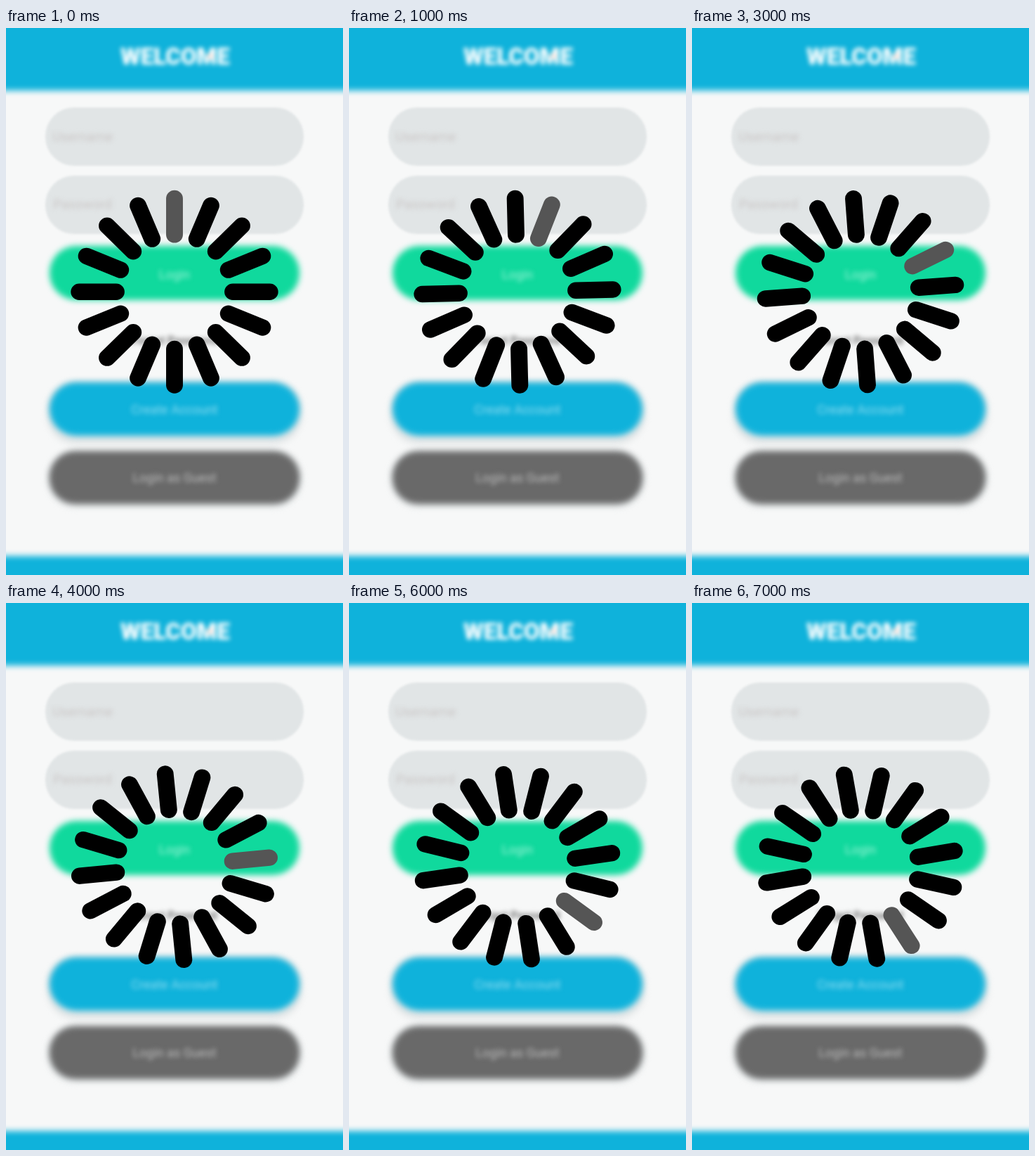
An HTML page for the animation above (8 s loop, 480 px wide and 778 px high).

```html
<!DOCTYPE html>
<html lang="en">
<head>
<meta charset="utf-8">
<title>Loading</title>
<style>
  html, body { margin: 0; height: 100%; overflow: hidden; background: #f7f8f8; }
  svg { display: block; width: 480px; height: 778px; }
  text { font: 18px Roboto, sans-serif; text-anchor: middle; }
  .soft { filter: url(#soft); }
  .edge { filter: url(#edge); }
  .label { filter: url(#label); }
</style>
</head>
<body>
<svg viewBox="0 0 480 778">
  <defs>
    <filter id="soft" filterUnits="userSpaceOnUse" x="-40" y="-40" width="560" height="860" color-interpolation-filters="sRGB"><feGaussianBlur stdDeviation="4.5"/></filter>
    <filter id="edge" filterUnits="userSpaceOnUse" x="0" y="0" width="480" height="778" color-interpolation-filters="sRGB"><feGaussianBlur stdDeviation="1.8"/></filter>
    <filter id="label" filterUnits="userSpaceOnUse" x="0" y="0" width="480" height="778" color-interpolation-filters="sRGB"><feGaussianBlur stdDeviation="3.2"/></filter>
  </defs>

  <g class="soft" fill="#0fb2db">
    <rect x="-40" y="-40" width="560" height="129"/>
    <rect x="-40" y="751" width="560" height="80"/>
  </g>
  <g class="edge" fill="#e1e5e6">
    <rect x="56" y="113" width="368" height="83" rx="41"/>
    <rect x="56" y="210" width="368" height="83" rx="41"/>
  </g>
  <g class="soft" fill="#e1e5e6">
    <rect x="58" y="502" width="364" height="90" rx="42"/>
    <rect x="58" y="600" width="364" height="82" rx="41"/>
  </g>
  <g class="soft">
    <rect x="62" y="310" width="356" height="77" rx="38" fill="#10d99d"/>
    <rect x="62" y="504" width="356" height="76" rx="38" fill="#0fb2db"/>
    <rect x="62" y="602" width="356" height="75" rx="37" fill="#696969"/>
  </g>

  <g class="label">
    <text x="241" y="52" fill="#fff" style="font-size:33px;font-weight:900">WELCOME</text>
    <circle cx="291" cy="40" r="5" fill="#ffe9e2"/>
    <g fill="#c9c5c5">
      <text x="109" y="161" style="font-size:19px">Username</text>
      <text x="109" y="257" style="font-size:19px">Password</text>
    </g>
    <text x="240" y="357" fill="#a0f3d8">Login</text>
    <text x="240" y="450" fill="#777" style="font-size:16px;font-weight:700">Forgot Password</text>
    <text x="240" y="549" fill="#8edcf0">Create Account</text>
    <text x="240" y="646" fill="#bbb">Login as Guest</text>
  </g>

  <g id="spinner" stroke-width="23.4" stroke-linecap="round"></g>
</svg>
<script>
  const BARS = 16, STEP_MS = 1000, STEPS = 8;
  const DRIFT = -360 / BARS / BARS;
  const spinner = document.getElementById('spinner');

  const bars = Array.from({ length: BARS }, (_, i) => {
    const bar = document.createElementNS('http://www.w3.org/2000/svg', 'line');
    bar.setAttribute('y1', -81.3);
    bar.setAttribute('y2', -132.8);
    bar.setAttribute('transform', `rotate(${i * 360 / BARS})`);
    return spinner.appendChild(bar);
  });

  function draw() {
    const step = Math.floor(performance.now() / STEP_MS) % STEPS;
    spinner.setAttribute('transform',
      `translate(240 375.2) scale(1.022 1) rotate(${step * DRIFT})`);
    bars.forEach((bar, i) => bar.setAttribute('stroke', i === step ? '#555' : '#000'));
    requestAnimationFrame(draw);
  }
  draw();
</script>
</body>
</html>
```
